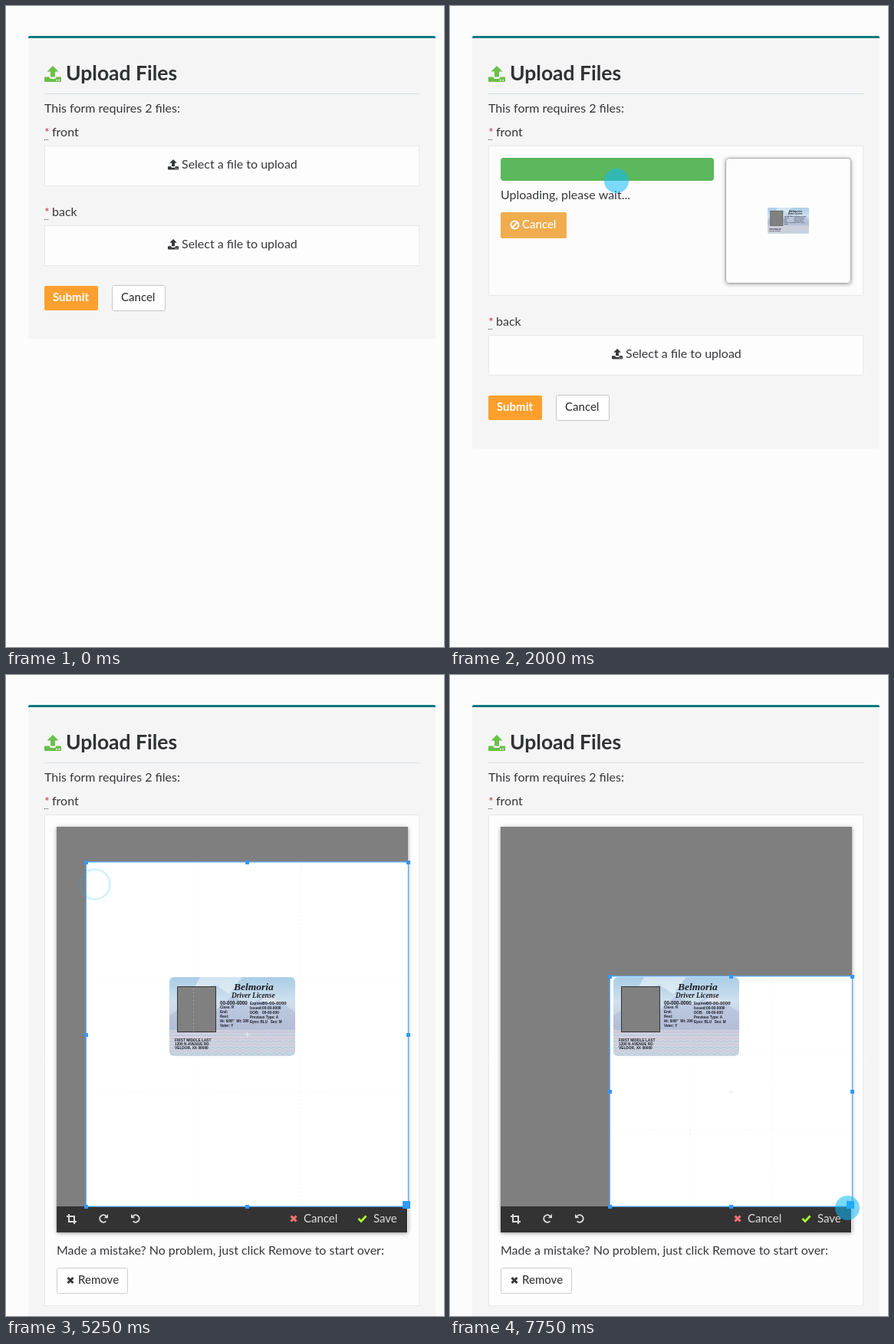
Recreate the animation shown at these times as an HTML page with a canvas. Size 571x836 px, loop 8 s.

```html
<!DOCTYPE html>
<html lang="en">
<head>
<meta charset="utf-8">
<title>Upload Files</title>
<style>
html, body { margin: 0; width: 100%; height: 100%; overflow: hidden; background: #fcfcfc; }
canvas { display: block; }
</style>
</head>
<body>
<canvas id="stage" width="571" height="836"></canvas>
<script>
const ctx = document.getElementById('stage').getContext('2d');
const LOOP = 8000, STEP = 250;
const SANS = 'Lato, "Open Sans", sans-serif';
const INK = '#36373a', BLUE = '#3399ff';

// Pointer keys: step, x, y, ring opacity (0 = solid disc)
const POINTER = [
  [2, 222, 262, .25], [3, 217, 228, 0], [8, 217, 228, 0], [9, 205, 250, .27],
  [10, 155, 378, .27], [11, 102, 530, .27], [12, 86, 680, .2], [13, 85, 708, 0],
  [14, 85, 708, 0], [15, 82, 560, .17], [16, 73, 274, .17], [17, 65, 205, .17],
  [18, 63, 196, 0], [20, 68, 204, 0], [21, 116, 273, .17], [22, 164, 338, .17],
  [23, 199, 388, 0], [24, 203, 388, 0], [25, 225, 405, .17], [28, 425, 588, .17],
  [29, 476, 640, 0], [31, 518, 695, 0]
];
// Top-left corner of the crop area: step, x, y
const CROP = [
  [14, 66, 198], [19, 66, 198], [20, 71, 204], [21, 104, 244],
  [22, 158, 325], [23, 202, 390], [24, 207, 392], [25, 208, 393]
];
const PROGRESS = [[4, .06], [5, .3], [6, .56], [7, .86], [8, 1]];

const uploadIcon = new Path2D('M11 0L18.5 7.5H14V14.5H8V7.5H3.5ZM1 14.5H6.5Q7 17 9 17H13Q15 17 15.5 14.5H21' +
  'Q22 14.5 22 15.5V20Q22 21 21 21H1Q0 21 0 20V15.5Q0 14.5 1 14.5ZM15 18V19.6H16.8V18ZM18.3 18V19.6H20.1V18Z');
const cropIcon = new Path2D('M3 0V10H13M0 3H10V13');
const crossIcon = new Path2D('M-3.5 -3.5L3.5 3.5M3.5 -3.5L-3.5 3.5');
const checkIcon = new Path2D('M-5 0L-1.5 3.5L5 -3.5');

function valuesAt(keys, step) {
  let i = 0;
  while (i < keys.length - 1 && keys[i + 1][0] <= step) i++;
  const a = keys[i], b = keys[i + 1];
  if (!b) return a.slice(1);
  const k = (step - a[0]) / (b[0] - a[0]);
  return a.slice(1).map((v, j) => v + (b[j + 1] - v) * k);
}

function text(str, x, y, size = 16, color = INK, weight = 400, family = SANS) {
  ctx.font = `${weight} ${size}px ${family}`;
  ctx.fillStyle = color;
  ctx.fillText(str, x, y);
}

function rect(x, y, w, h, fill, radius = 0) {
  ctx.fillStyle = fill;
  ctx.beginPath();
  ctx.roundRect(x, y, w, h, radius);
  ctx.fill();
}

function box(x, y, w, h, fill, border, radius = 0) {
  rect(x, y, w, h, fill, radius);
  ctx.strokeStyle = border;
  ctx.lineWidth = 1;
  ctx.beginPath();
  ctx.roundRect(x + .5, y + .5, w - 1, h - 1, radius);
  ctx.stroke();
}

function at(x, y, scale, draw) {
  ctx.save();
  ctx.translate(x, y);
  ctx.scale(scale, scale);
  draw();
  ctx.restore();
}

function withShadow(blur, color, draw) {
  ctx.save();
  ctx.shadowBlur = blur;
  ctx.shadowOffsetY = 1;
  ctx.shadowColor = color;
  draw();
  ctx.restore();
}

function strokeIcon(path, x, y, color, width) {
  at(x, y, 1, () => {
    ctx.strokeStyle = color;
    ctx.lineWidth = width;
    ctx.stroke(path);
  });
}

function upload(x, y, scale, color) {
  at(x, y, scale, () => {
    ctx.fillStyle = color;
    ctx.fill(uploadIcon, 'evenodd');
  });
}

function rotateIcon(x, flip) {
  ctx.save();
  ctx.translate(x, 709);
  ctx.scale(flip, 1);
  ctx.strokeStyle = ctx.fillStyle = '#ddd';
  ctx.lineWidth = 2;
  ctx.beginPath();
  ctx.arc(0, 0, 4.7, .8, 5.5);
  ctx.stroke();
  ctx.fill(new Path2D('M6 -6V-.8H.8Z'));
  ctx.restore();
}

function label(name, y) {
  text('*', 50, y, 16, '#c83c4a');
  ctx.fillStyle = '#444';
  for (let x = 50; x < 56; x += 2) ctx.fillRect(x, y + 4, 1, 1);
  text(name, 60, y);
}

function fileBox(y) {
  box(50, y, 489, 53, '#fdfdfd', '#e9e9e9');
  upload(211, y + 18, .64, INK);
  text('Select a file to upload', 229, y + 30);
}

function lowerForm(y) {
  label('back', y + 274);
  fileBox(y + 286);
  rect(50, y + 365, 70, 32, '#ffa02e', 2);
  text('Submit', 61, y + 385, 15, '#fff', 700);
  box(138, y + 364, 70, 34, '#fff', '#c3c6ca', 2);
  text('Cancel', 150, y + 385, 15, INK, 500);
}

function shape(points, fill) {
  ctx.fillStyle = fill;
  ctx.fill(new Path2D(points));
}

// Sample identity card, 164 x 103 units
function card() {
  ctx.save();
  ctx.beginPath();
  ctx.roundRect(0, 0, 164, 103, 6);
  ctx.clip();
  const sky = ctx.createLinearGradient(0, 0, 0, 103);
  [[0, '#a9cde6'], [.3, '#cfe0ee'], [.62, '#c3cbe0'], [.75, '#d3d3e0'], [1, '#c9d8e2']]
    .forEach(([stop, color]) => sky.addColorStop(stop, color));
  ctx.fillStyle = sky;
  ctx.fillRect(0, 0, 164, 103);
  shape('M40 0H95L78 22L60 10L30 18Z', 'rgba(255,255,255,.45)');
  shape('M0 50L25 34L55 48L82 24L104 36L130 22L164 46V68H0Z', 'rgba(160,170,205,.4)');
  shape('M118 31L130 22L150 36L134 34Z', 'rgba(255,255,255,.5)');
  ctx.lineWidth = .7;
  for (let row = 0; row < 9; row++) {
    ctx.strokeStyle = row % 2 ? 'rgba(205,130,160,.4)' : 'rgba(100,150,190,.4)';
    ctx.beginPath();
    for (let x = 0; x <= 164; x += 4) ctx.lineTo(x, 68 + row * 4 + (x / 4 % 2 ? 1.5 : -1.5) * row / 8);
    ctx.stroke();
  }
  box(10, 12, 51, 60, '#808080', '#333');

  const script = '"Liberation Serif", serif', small = '"Liberation Sans", Arial, sans-serif';
  const ink = '#1c1d24';
  const line = (str, x, y, size = 5) => text(str, x, y, size, ink, 700, small);
  text('Belmoria', 84, 17, 13.5, ink, 'italic 700', script);
  text('Driver License', 81, 27, 9.3, ink, 'italic 700', script);
  line('00-000-0000', 66, 36, 6.3);
  ['Class: R', 'End:', 'Rest:', 'Ht: 6/00"  Wt: 200', 'Voter: Y']
    .forEach((str, i) => line(str, 66, 41.3 + i * 6, 4.6));
  ['Expires:', 'Issued:', 'DOB:', 'Previous Type: A', 'Eyes: BLU   Sex: M']
    .forEach((str, i) => line(str, 105, 35.5 + i * 6, 4.6));
  line('00-00-0000', 121, 36, 6.2);
  line('00-00-0000', 121, 41.6, 4.8);
  line('00-00-000', 121, 47.6, 4.8);
  ['FIRST MIDDLE LAST', '1200 N AVENUE RD', 'VELDOR, XX 00000']
    .forEach((str, i) => line(str, 7, 83.8 + i * 5.3, 4.8));
  ctx.restore();
}

function uploading(progress) {
  box(50, 182, 489, 196, '#fcfcfc', '#e9e9e9');
  rect(66, 198, 278, 30, '#f4f4f4', 4);
  rect(66, 198, 278 * progress, 30, '#5cb85c', progress < 1 ? [4, 0, 0, 4] : 4);
  text('Uploading, please wait...', 66, 252);
  rect(66, 269, 86, 34, '#f0ad4e', 2);
  ctx.strokeStyle = '#fff';
  ctx.lineWidth = 2;
  ctx.beginPath();
  ctx.arc(84.5, 285.5, 5, 0, 7);
  ctx.moveTo(81, 289);
  ctx.lineTo(88, 282);
  ctx.stroke();
  text('Cancel', 94, 290, 15, '#fff', 500);
  withShadow(5, 'rgba(0,0,0,.35)', () => rect(359, 198, 164, 164, '#fff', 4));
  box(359, 198, 164, 164, '#fdfdfd', '#a8a8a8', 4);
  at(414, 263, 54 / 164, card);
}

function cropArea(x, y) {
  const right = 524, bottom = 693, midX = (x + right) / 2, midY = (y + bottom) / 2;
  ctx.fillStyle = 'rgba(0,0,0,.5)';
  ctx.fillRect(66, 198, 458, y - 198);
  ctx.fillRect(66, y, x - 66, bottom - y);

  ctx.strokeStyle = 'rgba(225,225,225,.6)';
  ctx.lineWidth = 1;
  ctx.setLineDash([1, 4]);
  ctx.beginPath();
  for (const k of [1 / 3, 2 / 3]) {
    const gx = Math.round(x + (right - x) * k) + .5, gy = Math.round(y + (bottom - y) * k) + .5;
    ctx.moveTo(gx, y);
    ctx.lineTo(gx, bottom);
    ctx.moveTo(x, gy);
    ctx.lineTo(right, gy);
  }
  ctx.stroke();
  ctx.setLineDash([]);
  ctx.fillStyle = 'rgba(235,235,235,.8)';
  ctx.fillRect(midX - 3, midY, 7, 1);
  ctx.fillRect(midX, midY - 3, 1, 7);

  ctx.strokeStyle = '#5aa9f8';
  ctx.lineWidth = 1.3;
  ctx.strokeRect(x + .3, y - .2, right - x + .2, bottom - y + .4);
  ctx.fillStyle = BLUE;
  for (const hx of [x, midX, right])
    for (const hy of [y, midY, bottom])
      if (hx !== midX || hy !== midY) ctx.fillRect(Math.round(hx) - 2, Math.round(hy) - 2, 5, 5);
  ctx.fillRect(517, 686, 10, 10);
}

function editor(step) {
  box(50, 182, 489, 641, '#fdfdfd', '#e9e9e9');
  withShadow(5, 'rgba(0,0,0,.4)', () => rect(66, 198, 458, 529, '#fff'));
  at(213, 394, 1, card);
  rect(66, 693, 457, 34, '#333');
  strokeIcon(cropIcon, 79, 703, '#ddd', 2);
  rotateIcon(127, 1);
  rotateIcon(169, -1);
  if (step >= 14) {
    strokeIcon(crossIcon, 375, 709, '#f87474', 3);
    text('Cancel', 388, 714, 15, '#ddd');
    strokeIcon(checkIcon, 464.5, 709, '#adff2f', 2.8);
    text('Save', 479, 714, 15, '#ddd');
    cropArea(...valuesAt(CROP, step));
  }
  if (step >= 13 && step <= 16) {
    rect(66, 663, 42, 22, '#999', 3);
    shape('M82 685H92L87 690Z', '#999');
    text('Crop', 74, 678, 12.5, '#fff', 400, '"Liberation Sans", Arial, sans-serif');
  }
  text('Made a mistake? No problem, just click Remove to start over:', 66, 756);
  box(66, 773, 93, 34, '#fff', '#ccc', 2);
  strokeIcon(crossIcon, 84, 789.5, INK, 3);
  text('Remove', 94, 794, 15, INK, 500);
}

function pointer(step) {
  const [x, y, ring] = valuesAt(POINTER, step);
  ctx.beginPath();
  if (ring) {
    ctx.arc(x, y, 19.5, 0, 7);
    ctx.strokeStyle = `rgba(15,185,248,${ring})`;
    ctx.lineWidth = 3;
    ctx.stroke();
  } else {
    ctx.arc(x, y, 16, 0, 7);
    ctx.fillStyle = 'rgba(15,185,248,.55)';
    ctx.fill();
  }
}

function draw(step) {
  const editing = step >= 9, busy = step >= 4 && !editing;
  rect(0, 0, 571, 836, '#fcfcfc');
  rect(29, 41, 531, editing ? 795 : busy ? 536 : 393, '#f5f5f5');
  rect(29, 39, 531, 3, '#0a7a80', [2, 2, 0, 0]);
  upload(50, 78, 1, '#6cbf4b');
  text('Upload Files', 78, 97, 26.5, '#303135', 700);
  rect(50, 114, 489, 1, step >= 24 ? '#dcdcdc' : '#d5dfe5');
  text('This form requires 2 files:', 50, 139);
  label('front', 170);
  if (editing) {
    editor(step);
  } else {
    if (busy) uploading(valuesAt(PROGRESS, step)[0]);
    else fileBox(182);
    lowerForm(busy ? 143 : 0);
  }
  if (step >= 2) pointer(step);
}

function frame() {
  draw(Math.floor(performance.now() % LOOP / STEP));
  requestAnimationFrame(frame);
}
frame();
</script>
</body>
</html>
```
